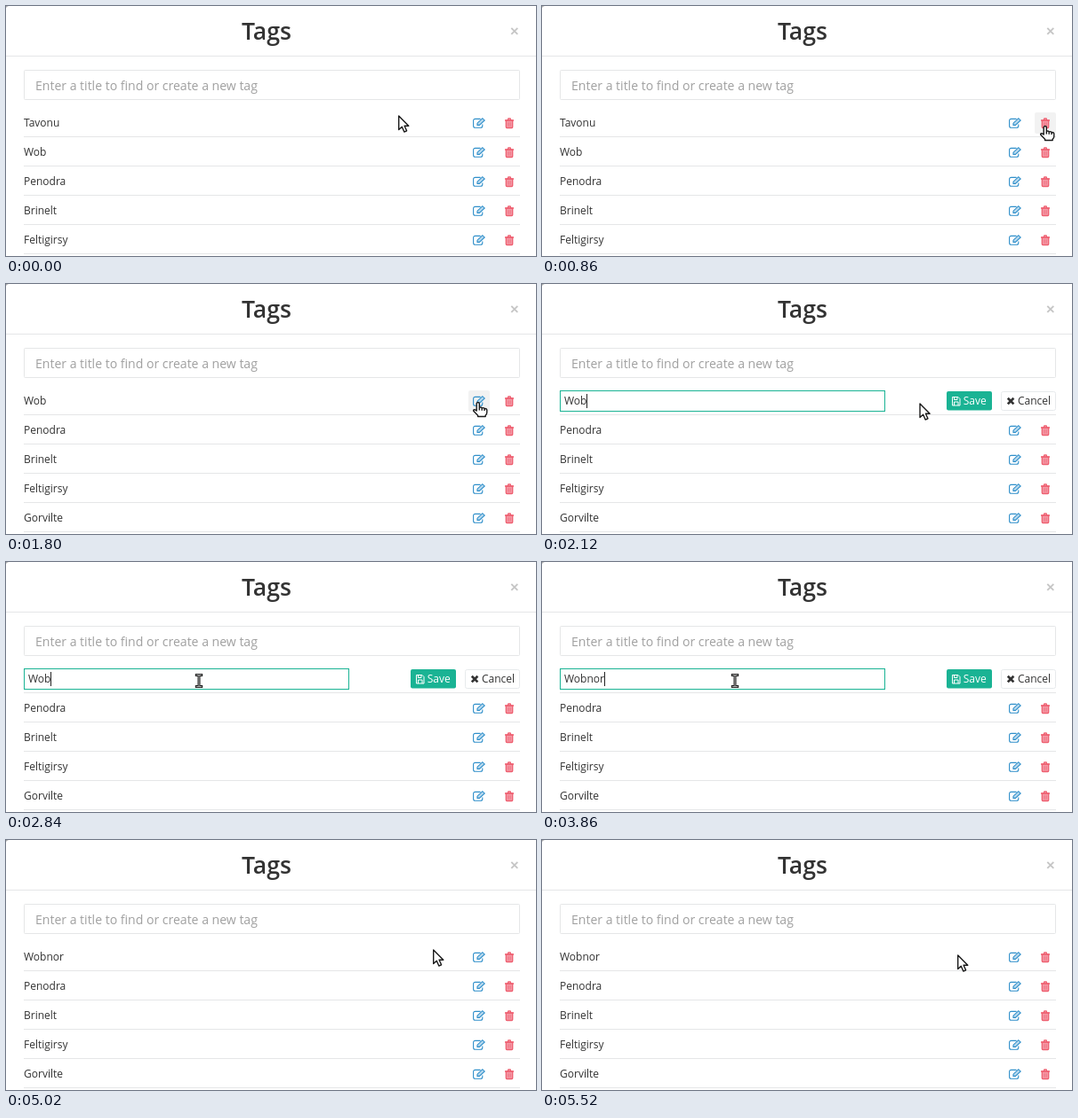
Recreate the animation shown at these times as an HTML page. Size 596x282 px, loop 5.6 s.

```html
<!DOCTYPE html>
<html lang="en">
<head>
<meta charset="utf-8">
<title>Tags</title>
<style>
  html, body { margin: 0; width: 100%; height: 100%; overflow: hidden; background: #fff; }
  svg { display: block; font: 12px "Open Sans", sans-serif; fill: #333; }
  .line { stroke: #e5e6e7; fill: none; }
  .edit { stroke: #2f8fca; fill: none; stroke-width: 1.1; }
  .trash { stroke: #ee5f70; fill: #f49aa6; stroke-width: 1.3; }
  .cursor { fill: #fff; stroke: #1a1a1a; stroke-width: 1.4; stroke-linejoin: round; }
</style>
</head>
<body>
<svg id="stage" width="596" height="282" viewBox="0 0 596 282">
  <defs>
    <g id="editIcon" class="edit">
      <path d="M10.8 7.4v1.8a2 2 0 0 1-2 2H2.6a2 2 0 0 1-2-2V3.4a2 2 0 0 1 2-2h6"/>
      <path d="M5 8.4V6.2L10.8.7l2.4 2.2-5.8 5.5z" fill="#b9d9ee"/>
    </g>
    <g id="trashIcon" class="trash">
      <path d="M1.3 2.9h7.4v7.2a1.1 1.1 0 0 1-1.1 1.1H2.4a1.1 1.1 0 0 1-1.1-1.1z"/>
      <path d="M0 2.7h10M3.2 2.4L3.9.7h2.2l.7 1.7" fill="none"/>
      <path d="M3.6 4.9v4.4M5 4.9v4.4M6.4 4.9v4.4" stroke-width=".5"/>
    </g>
  </defs>

  <path d="M0 0h3Q1 .6 0 2z" fill="#aaa"/>
  <text x="293" y="38" font-size="26.6" font-weight="600" text-anchor="middle">Tags</text>
  <path d="M568.3 24.8l7 7m0-7l-7 7" stroke="#c6c6c6" stroke-width="1.9"/>
  <path class="line" d="M0 56.5h596"/>
  <rect class="line" x="20.5" y="72.5" width="557" height="33" rx="1"/>
  <text x="33" y="95" font-size="14.05" fill="#a0a0a0">Enter a title to find or create a new tag</text>

  <rect id="hover" y="120" width="24" height="24" rx="2" fill="#f2f2f2"/>
  <g id="rows"></g>

  <g id="form">
    <rect x="20.5" y="120.5" width="365" height="23" fill="#fff" stroke="#1ab394"/>
    <text id="value" x="25" y="136"></text>
    <path id="caret" d="M0 124v16" stroke="#222"/>
    <rect id="save" x="455" y="121" width="51" height="21.5" rx="2"/>
    <g fill="none" stroke="#fff">
      <path d="M461.5 127.5h6.5l2 2v7.5h-8.5z"/>
      <path d="M463.5 127.5v3h3.5v-3M463.5 137v-4h4.5v4"/>
    </g>
    <text x="473.7" y="136" fill="#fff">Save</text>
    <rect id="cancel" x="516.5" y="121.5" width="61" height="21" rx="2" stroke="#e7eaec"/>
    <path d="M523.8 128.8l6.6 6.6m0-6.6l-6.6 6.6" stroke="#333" stroke-width="2.7"/>
    <text x="535" y="136">Cancel</text>
  </g>

  <g id="pointer">
    <path id="arrow" class="cursor" d="M.7.9v15.6l3.6-3.3 2.5 5.8 2.8-1.2-2.5-5.6h4.7z"/>
    <path id="hand" class="cursor" d="M-1.8 9V1a1.5 1.5 0 0 1 3.1 0V5.4q1.7-.9 2.9.5 1.7-.7 2.8.6 2.4-.4 2.8 1.5V11q0 2.2-1.6 3.2v1.3H-.4v-1.3L-5 9.6q-.9-1.4.5-1.9 1.3-.2 2.7 1.3zM1.3 5.4v3.2M4.2 5.9v2.9M7 6.5v2.6"/>
    <g id="beam" fill="none">
      <path d="M-4.2-6.6h8.4M-4.2 6.6h8.4M0-6.6V6.6" stroke="#1a1a1a" stroke-width="3"/>
      <path d="M-3.2-6.6h6.4M-3.2 6.6h6.4M0-6.6V6.6" stroke="#ddd" stroke-width=".8"/>
    </g>
  </g>
</svg>
<script>
const LOOP = 5600, DELETE = 1000, EDIT = 1880, SAVE = 4980;
const TAGS = ["Tavonu", "Wob", "Penodra", "Brinelt", "Feltigirsy", "Gorvilte"];
const RENAMED = "Wobnor";

// time, x, y of the pointer's hot spot
const PATH = [
  [0, 441, 123], [580, 565, 135], [860, 566, 136], [1180, 566, 136],
  [1340, 563, 133], [1700, 532, 134], [1800, 531, 134], [2620, 217, 134],
  [4320, 217, 134], [4580, 480, 123], [5020, 480, 123], [5460, 467, 129]
];
const KEYS = [3460, 3660, 3860];
const CARET_ON = [[EDIT, 2340], [2800, 3100], [3460, 4360], [4860, SAVE]];

const el = {};
document.querySelectorAll("[id]").forEach(n => el[n.id] = n);
const show = (node, on) => node.style.display = on ? "" : "none";
const within = (v, a, b) => v >= a && v < b;

el.rows.innerHTML = TAGS.slice(1).map((_, i) => `
  <g transform="translate(0 ${i * 33})">
    <path class="line" d="M20 147.5h558"/>
    <g class="content">
      <text x="20" y="136"></text>
      <use href="#editIcon" x="525" y="126"/>
      <use href="#trashIcon" x="561" y="126.3"/>
    </g>
  </g>`).join("");
const contents = [...el.rows.querySelectorAll(".content")];
const labels = contents.map(c => c.querySelector("text"));

function pointerAt(t) {
  const i = PATH.findIndex(p => p[0] > t);
  if (i < 0) return PATH[PATH.length - 1].slice(1);
  const [t0, x0, y0] = PATH[i - 1], [t1, x1, y1] = PATH[i];
  const u = (t - t0) / (t1 - t0), k = u * u * (3 - 2 * u);
  return [x0 + (x1 - x0) * k, y0 + (y1 - y0) * k];
}

function render(t) {
  const editing = within(t, EDIT, SAVE);
  const list = t < DELETE ? TAGS : TAGS.slice(1);
  labels.forEach((label, i) => {
    label.textContent = i === 0 && t >= SAVE ? RENAMED : list[i];
  });
  show(contents[0], !editing);
  show(el.form, editing);

  const [x, y] = pointerAt(t);
  const onEdit = !editing && within(x, 520, 544);
  const onTrash = !editing && within(x, 554, 578);
  const onSave = editing && within(x, 455, 506);
  const onCancel = editing && within(x, 516, 578);
  const onInput = editing && x < 386;

  show(el.hover, onEdit || onTrash);
  el.hover.setAttribute("x", onEdit ? 520 : 554);
  el.save.setAttribute("fill", onSave ? "#18a689" : "#1ab394");
  el.cancel.setAttribute("fill", onCancel ? "#f2f2f2" : "#fff");

  if (editing) {
    const typed = KEYS.filter(k => t >= k).length;
    el.value.textContent = RENAMED.slice(0, 3 + typed);
    const end = Math.round(25 + el.value.getComputedTextLength()) + .5;
    el.caret.setAttribute("transform", `translate(${end} 0)`);
    show(el.caret, CARET_ON.some(([a, b]) => within(t, a, b)));
  }

  const onButton = onEdit || onTrash || onSave || onCancel;
  show(el.hand, onButton);
  show(el.beam, onInput);
  show(el.arrow, !onButton && !onInput);
  el.pointer.setAttribute("transform", `translate(${x} ${y})`);
}

const start = performance.now();
function tick() {
  render((performance.now() - start) % LOOP);
  requestAnimationFrame(tick);
}
tick();
</script>
</body>
</html>
```
